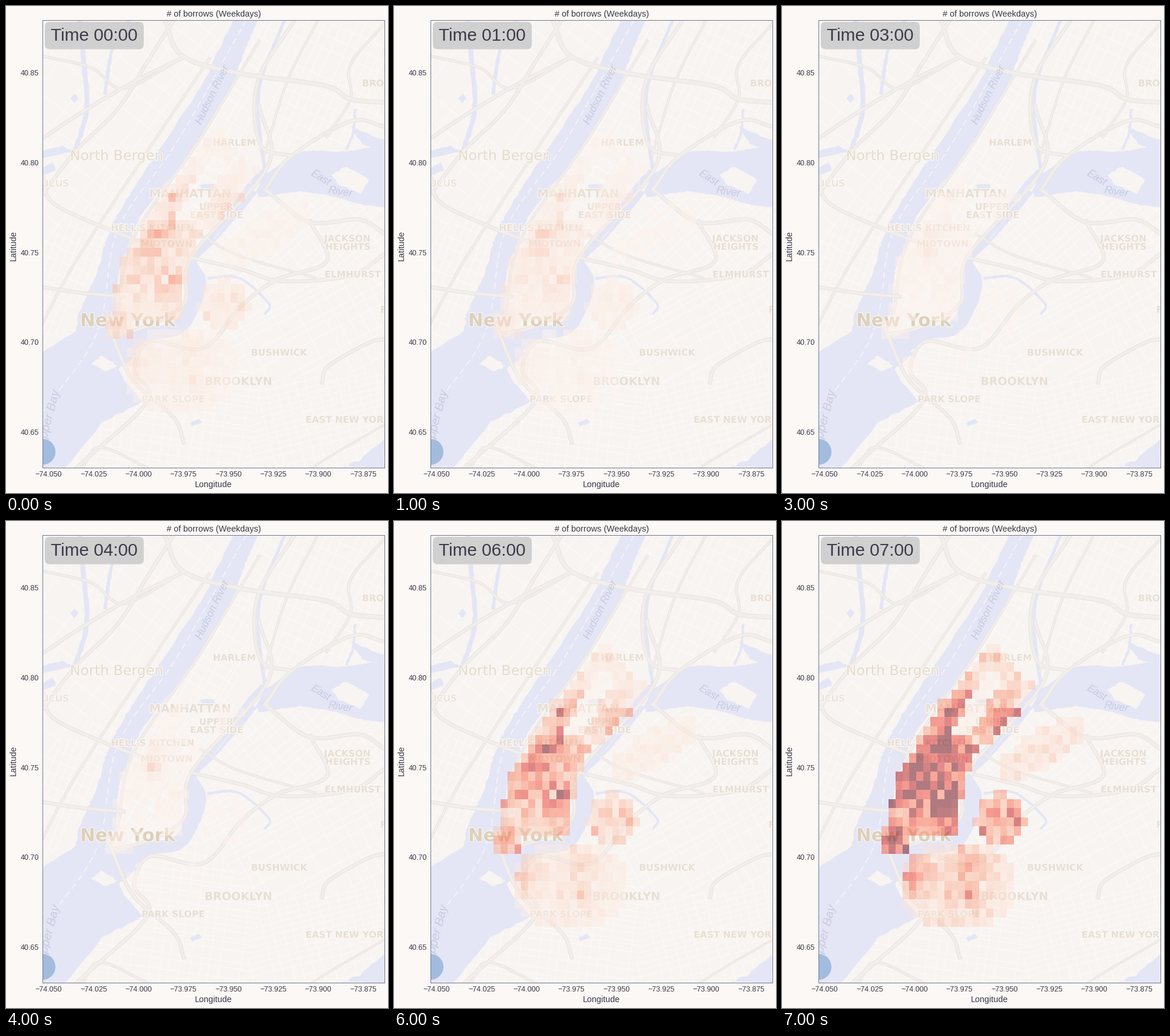
A matplotlib script that plays this animation: 649x828 px, repeating every 8000 ms.

```python
import numpy as np
import matplotlib.pyplot as plt
from matplotlib.animation import FuncAnimation
from matplotlib.collections import LineCollection
from matplotlib.patches import Circle, FancyBboxPatch, Polygon
from matplotlib.patheffects import withStroke

W, H, DPI = 649, 828, 64
L, R, T, B = 62, 643, 24, 785
PT = 72 / DPI
PAPER, LAND, WATER = "#fbf8f5", "#f8f4f1", "#e4e6f6"
INK, TAN, BLUE = "#3b3a47", "#e8dfd5", "#c8cae0"
rng = np.random.default_rng(11)

fig = plt.figure(figsize=(W / DPI, H / DPI), dpi=DPI, facecolor=PAPER)
ax = fig.add_axes([L / W, 1 - B / H, (R - L) / W, (B - T) / H], facecolor=LAND)
ax.set(xlim=(L, R), ylim=(B, T), xticks=[], yticks=[])
for side in ax.spines.values():
    side.set(color="#6f788f", linewidth=PT, zorder=20)


# ---- drawing helpers, all in stage pixels ----
def spline(pts, steps=12):
    """Catmull-Rom curve through key points of any dimension."""
    p = np.array(pts, float)
    p = np.vstack([2 * p[0] - p[1], p, 2 * p[-1] - p[-2]])
    t = np.linspace(0, 1, steps, endpoint=False)[:, None]
    parts = [.5 * (2 * b + (c - a) * t + (2 * a - 5 * b + 4 * c - d) * t**2
                   + (3 * b - a - 3 * c + d) * t**3)
             for a, b, c, d in zip(p, p[1:], p[2:], p[3:])]
    return np.vstack(parts + [p[-2:-1]])


def fill(pts, color=WATER, z=2):
    ax.add_patch(Polygon(pts, fc=color, lw=0, zorder=z))


def area(*pts, color=WATER, jag=1.2):
    p = np.array(pts + pts[:1], float)
    t = np.linspace(0, 1, 6, endpoint=False)[:, None]
    edge = np.vstack([a + (b - a) * t for a, b in zip(p, p[1:])])
    fill(edge + rng.uniform(-jag, jag, edge.shape), color)


def river(*pts, jag=.7):
    """Water of varying width along (x, y, width) key points."""
    x, y, w = spline(pts).T
    dx, dy = np.gradient(x), np.gradient(y)
    normal = np.stack([-dy, dx], 1) / np.hypot(dx, dy)[:, None]
    mid = np.stack([x, y], 1)
    bank = normal * w[:, None] / 2
    noise = rng.uniform(-jag, jag, (2,) + mid.shape)
    fill(np.vstack([mid + bank + noise[0], (mid - bank + noise[1])[::-1]]))


def road(*pts, width=6.5):
    x, y = spline(pts).T
    ax.plot(x, y, color="#eae5e1", lw=width * PT, zorder=4)
    ax.plot(x, y, color="#f2eeeb", lw=(width - 2.2) * PT, zorder=4.1)


def streets(angle, gap, *corners):
    """Two crossing sets of thin streets inside an outline."""
    p = np.array(corners, float)
    mid, reach = p.mean(0), np.ptp(p, axis=0).max()
    lines = []
    for turn, step in ((0, gap), (90, gap * 1.7)):
        a = np.radians(angle + turn)
        u, v = np.array([np.cos(a), -np.sin(a)]), np.array([np.sin(a), np.cos(a)])
        for s in np.arange(-reach, reach, step):
            if rng.random() < .8:
                c = mid + v * (s + rng.uniform(-2, 2))
                lines.append([c - u * reach, c + u * reach])
    lc = LineCollection(lines, colors="#fdfbf9", linewidths=.9 * PT, zorder=1)
    ax.add_collection(lc, autolim=False)
    lc.set_clip_path(Polygon(corners, closed=True, transform=ax.transData))


def label(x, y, s, size=15.6, color=TAN, ha="center", weight="bold"):
    t = ax.text(x, y, s, fontsize=size * PT, color=color, ha=ha, va="center",
                weight=weight, family="DejaVu Sans", zorder=6, clip_on=True)
    t.set_path_effects([withStroke(linewidth=2.5 * PT, foreground="#faf7f4")])


def river_name(x, y, s, angle, size=18):
    ax.text(x, y, s, fontsize=size * PT, color=BLUE, family="Liberation Sans",
            style="italic", rotation=angle, ha="center", va="center",
            rotation_mode="anchor", zorder=6, clip_on=True)


def caption(x, y, s, size, ha="center", **kw):
    return ax.text(x, y, s, fontsize=size * PT, color=INK, ha=ha,
                   family="Liberation Sans", **kw)


# ---- streets ----
streets(52, 19, (62, 24), (383, 24), (245, 272), (62, 400))
streets(68, 12, (62, 400), (245, 272), (140, 480), (62, 590))
streets(60, 10, (430, 24), (478, 24), (300, 540), (172, 550), (192, 450))
streets(66, 13, (478, 24), (643, 24), (643, 235), (430, 240))
streets(40, 12, (345, 410), (432, 315), (643, 340), (643, 470), (345, 460))
streets(28, 11, (345, 460), (643, 470), (643, 620), (440, 640), (330, 545))
streets(-8, 10, (240, 555), (330, 545), (440, 640), (400, 785), (105, 785))
streets(14, 10, (440, 640), (643, 620), (643, 785), (400, 785))

# ---- water and islands ----
river((418, 0, 38), (388, 65, 40), (350, 150, 47), (278, 258, 44), (216, 345, 35),
      (190, 400, 38), (173, 455, 37), (157, 520, 60), jag=1.5)
area((127, 512), (187, 512), (172, 548), (222, 590), (190, 620), (230, 672),
     (165, 708), (102, 785), (62, 785), (62, 590), (118, 552), jag=2)
river((190, 585, 44), (240, 558, 22), (290, 548, 24), (314, 515, 26), (322, 470, 36),
      (318, 432, 14), (342, 403, 16), (378, 362, 18), (412, 318, 22), (440, 283, 18))
river((425, 312, 28), (470, 295, 48), (510, 282, 70), (560, 286, 76), (610, 290, 96),
      (660, 290, 108))
river((480, 10, 5), (440, 105, 5), (428, 175, 5), (440, 285, 6))
river((124, 10, 8), (131, 85, 8), (137, 175, 8), (117, 248, 8))
river((218, 10, 6), (182, 70, 6), (168, 150, 6))
river((342, 463, 5), (395, 462, 4), (446, 505, 4), (440, 524, 4))
river((593, 175, 4), (590, 215, 4), (578, 245, 4))
area((62, 246), (95, 238), (115, 248), (62, 258))
area((62, 276), (80, 266), (85, 280), (62, 287))
area((109, 157), (117, 149), (123, 157), (116, 165), jag=.4)
area((585, 205), (643, 228), (643, 250), (605, 235))
area((330, 304), (352, 302), (355, 309), (332, 313), jag=.6)
area((313, 708), (328, 702), (333, 708), (316, 715), jag=.6)
area((570, 785), (602, 772), (643, 736), (643, 785), jag=2)
area((553, 287), (578, 273), (617, 295), (603, 319), (565, 303), color=LAND)
area((412, 310), (437, 290), (424, 316), color=LAND)
area((345, 405), (385, 356), (362, 387), color=LAND, jag=.4)
area((145, 608), (163, 594), (190, 612), (170, 621), color=LAND)
x, y = spline([(408, 24), (290, 232), (190, 380), (155, 555), (62, 690)]).T
ax.plot(x, y, color="#f6f5f8", lw=1.6 * PT, ls=(0, (7, 4)), zorder=3)

# ---- main roads ----
road((270, 24), (300, 85), (400, 115), (540, 135), (585, 158), (643, 164), width=8)
road((62, 225), (130, 180), (215, 130), (300, 88))
road((62, 320), (120, 245), (190, 175), (240, 95), (285, 24))
road((62, 85), (145, 105), (200, 140), (300, 88), width=5)
road((62, 290), (80, 335), (170, 378), (250, 408))
road((62, 478), (130, 488), (200, 494))
road((62, 540), (115, 440), (215, 285), (345, 90), width=5)
road((430, 60), (330, 225), (216, 395), (190, 520), (176, 550), width=5)
road((430, 170), (445, 272), (316, 425), (303, 505), (240, 544), (182, 558))
road((120, 785), (240, 672), (218, 620), (245, 570), (335, 582), (400, 510),
     (460, 465), (545, 434), (517, 366))
road((315, 428), (400, 448), (470, 468), (585, 458), (643, 422))
road((440, 312), (515, 367), (600, 363), (643, 387), width=7)
road((440, 312), (485, 255), (585, 196), (643, 205))
road((490, 24), (427, 130), (432, 235), (485, 255))
road((176, 550), (215, 635), (285, 700), (302, 742))
road((537, 640), (548, 612), (613, 574), (643, 566))
road((643, 30), (585, 100), (585, 158), (545, 222), width=5)
road((530, 24), (478, 128), (438, 255), width=4.5)
road((330, 388), (395, 424), (525, 462), width=4.5)
road((130, 785), (160, 750), (240, 785), width=5)
road((643, 712), (560, 760), (520, 785), width=4)

# ---- place names ----
label(188, 255, "North Bergen", 23.7, "#e5dccd", weight="normal")
label(207, 536, "New York", 30.8, "#ddd0bb")
label(107, 301, "Secaucus", 20, ha="right", weight="normal")
label(313, 320, "MANHATTAN", 19.7)
label(395, 639, "BROOKLYN", 19)
for x, y, name in ((388, 233, "HARLEM"), (357, 342, "UPPER"), (358, 356, "EAST SIDE"),
                   (249, 378, "HELL'S KITCHEN"), (273, 405, "MIDTOWN"),
                   (580, 396, "JACKSON"), (581, 410, "HEIGHTS"),
                   (589, 457, "ELMHURST"), (464, 590, "BUSHWICK"),
                   (284, 669, "PARK SLOPE")):
    label(x, y, name)
for x, y, name in ((509, 704, "EAST NEW YORK"), (605, 132, "BRONX"), (636, 517, "FOREST")):
    label(x, y, name, ha="left")
river_name(352, 151, "Hudson River", 64)
river_name(534, 293, "East", -32)
river_name(568, 317, "River", -9)
river_name(74, 701, "Upper Bay", 75, 21)
ax.add_patch(Circle((62, 758), 22, fc="#a3bbdd", lw=0, zorder=7))

# ---- demand field on a 0-8 colour scale ----
COLS, ROWS, CW, CH, X0, Y0 = 29, 31, 11.83, 15.5, 169, 210
row, col = np.mgrid[:ROWS, :COLS]


def bump(c, r, spread):
    return np.exp(-((col - c)**2 + (row - r)**2) / (2 * spread**2))


def oval(c, r, rc, rr, slope=0):
    return ((col - c) / rc)**2 + ((row - r - slope * (col - c)) / rr)**2 < 1


west = np.interp(row, [0, 3, 6, 14, 20], [15, 11.5, 8, 2, 0])
east = np.interp(row, [0, 4, 7, 12, 20, 20.9, 22], [16.5, 21, 19, 12.5, 10, 4, 3])
manhattan = (col >= west) & (col <= east) & (row <= 22)
park = (abs(col - 13 + .7 * (row - 6.5)) < 1.4) & (row >= 3) & (row < 10)
brooklyn = oval(10.5, 26, 8.5, 4.8)
north_side = oval(16.5, 18.7, 3.6, 2.9)
queens = oval(22.5, 11, 6.5, 2.3, -.4)

core = (1.5 + 2.2 / (1 + np.exp(7 - row)) + 4.5 * bump(7, 12, 2.2)
        + 7 * bump(9, 17, 1.6) + 4 * bump(3, 15.5, 1.6) + 4 * bump(10, 8, 1.3)
        + 4 * bump(11.5, 5, .9) + 3 * bump(17, 7.8, 1.1) + 3.5 * bump(1, 20.7, 1))
suburb = .8 + 3 * bump(4.5, 24.8, 1.5) + 1.8 * bump(11.5, 25.5, 2.8)
demand = np.select([park, manhattan, north_side, brooklyn, queens],
                   [.3, core, 3, suburb, .9], 0)
demand = demand * rng.lognormal(0, .36, demand.shape)

# Commuter terminals stand out in the small hours.
PORT, PENN = bump(6.2, 11, .6), bump(6.3, 13, .6)
HOURS = [(.22, 2, 1.5), (.11, 1.5, 1), (.04, 1.2, .8), (.03, .6, 1),
         (.025, .4, 2), (.18, 7.5, 2.5), (.5, 3, 2), (1, 0, 0)]


def heat_at(hour):
    share, port, penn = HOURS[hour]
    return np.ma.masked_less(share * demand + port * PORT + penn * PENN, .1)


heat = ax.imshow(heat_at(0), cmap="Reds", vmin=0, vmax=8, alpha=.5, aspect="auto",
                 interpolation="nearest", zorder=8,
                 extent=(X0, X0 + COLS * CW, Y0 + ROWS * CH, Y0))
ax.set(xlim=(L, R), ylim=(B, T))

# ---- captions ----
caption(353, 18, "# of borrows (Weekdays)", 14.4)
caption(352.5, 818, "Longitude", 14.4)
caption(13, 407, "Latitude", 14.4, rotation=90, va="center")
for i in range(8):
    caption(72.5 + 76.35 * i, 800.5, f"\u2212{74.05 - .025 * i:.3f}", 12.5)
for i in range(5):
    caption(56, 118 + 152.75 * i, f"{40.85 - .05 * i:.2f}", 12.5, ha="right")
ax.add_patch(FancyBboxPatch((66, 27), 168, 46.5, fc="#d0d0d0", lw=0, zorder=10,
                            boxstyle="round,pad=0,rounding_size=8"))
clock = caption(76, 59, "", 29.8, ha="left", zorder=11)


def draw(hour):
    heat.set_data(heat_at(hour))
    clock.set_text(f"Time {hour:02d}:00")
    return heat, clock


anim = FuncAnimation(fig, draw, frames=8, interval=1000, repeat=True)
plt.show()
```
